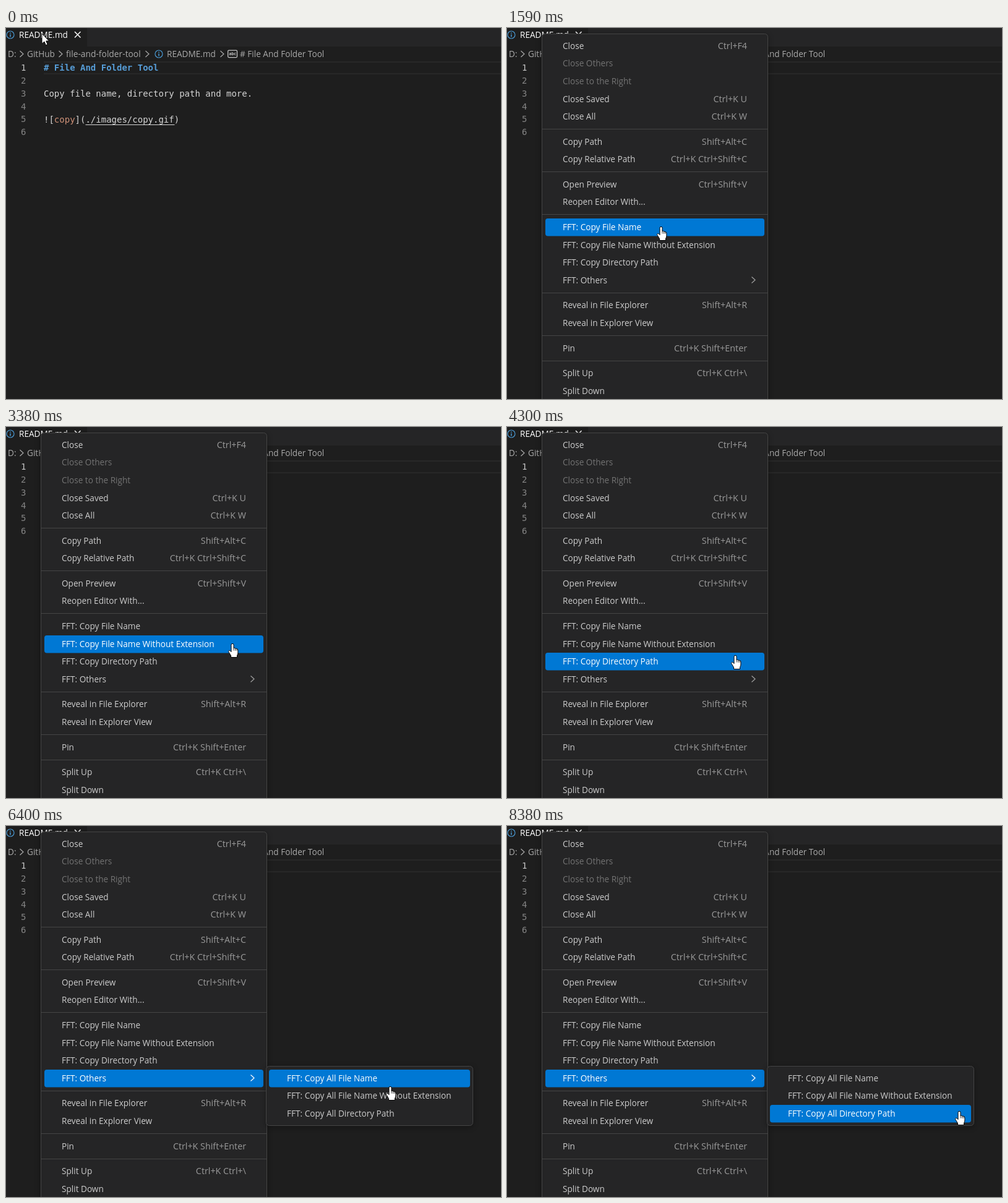
An HTML page that plays this animation: 800 px wide and 600 px high, repeating every 8690 ms.

```html
<!DOCTYPE html>
<html lang="en">
<head>
<meta charset="utf-8">
<title>Editor tab context menu</title>
<style>
  html, body { margin: 0; width: 100%; height: 100%; overflow: hidden; background: #1e1e1e; }
  svg { display: block; width: 100%; height: 100%; }
  text { font: 13.6px "Open Sans", "Noto Sans", sans-serif; white-space: pre; }
  .mono { font: 14px "DejaVu Sans Mono", monospace; }
  .bold { font-weight: bold; }
  .key { font-size: 14.3px; }
  .path { font-size: 13.8px; }
  .abc { font-size: 6.5px; font-weight: bold; }
  .panel { filter: drop-shadow(0 2px 4px rgba(0, 0, 0, .36)); }
</style>
</head>
<body>
<svg id="stage" viewBox="0 0 800 600" xmlns="http://www.w3.org/2000/svg"></svg>
<script>
const LOOP = 8690, STEP = 65;
const stage = document.getElementById('stage');

function add(parent, tag, attrs, content) {
  const el = document.createElementNS(stage.namespaceURI, tag);
  for (const k in attrs) el.setAttribute(k, attrs[k]);
  if (content) el.textContent = content;
  parent.appendChild(el);
  return el;
}
const rect = (p, x, y, width, height, fill, more) =>
  add(p, 'rect', { x, y, width, height, fill, ...more });
const text = (p, x, y, content, fill, more) =>
  add(p, 'text', { x, y, fill, ...more }, content);
const line = (p, d, stroke, width = 1.2) =>
  add(p, 'path', { d, fill: 'none', stroke, 'stroke-width': width });
const chevron = (p, x, y, stroke) => line(p, `M${x} ${y - 5}l5.5 5-5.5 5`, stroke);

function info(x, y) {
  const blue = '#4a9ad4';
  add(stage, 'circle', { cx: x, cy: y, r: 6, fill: 'none', stroke: blue, 'stroke-width': 1.2 });
  line(stage, `M${x} ${y - 3.6}v1.7M${x} ${y - .8}v4.4`, blue, 1.5);
}

// Editor: tab strip, breadcrumbs, code
rect(stage, 0, 0, 800, 600, '#1e1e1e');
rect(stage, 131, 0, 669, 30, '#252526');
info(7, 11);
text(stage, 21, 16, 'README.md', '#ffffff');
line(stage, 'M111 6l9.5 9.5M120.5 6l-9.5 9.5', '#ffffff', 1.5);

const crumb = '#a9a9a9';
text(stage, 3, 47, 'D:', crumb);
text(stage, 34, 47, 'GitHub', crumb);
text(stage, 97, 47, 'file-and-folder-tool', crumb, { class: 'path' });
text(stage, 260, 47, 'README.md', crumb);
text(stage, 378, 47, '# File And Folder Tool', crumb);
for (const x of [22.5, 85.5, 225.5, 346.5]) chevron(stage, x, 42, crumb);
info(247, 42);
rect(stage, 358.7, 36.2, 14.8, 11.4, 'none', { rx: 1.5, stroke: '#c5c5c5', 'stroke-width': 1.3 });
text(stage, 366.1, 44.2, 'abc', '#c5c5c5', { class: 'abc', 'text-anchor': 'middle' });

rect(stage, 61, 54, 739, 2, '#282828');
rect(stage, 61, 73, 739, 2, '#282828');
for (let i = 0; i < 6; i++)
  text(stage, 32.4, 69 + Math.round(i * 20.85), String(i + 1), i ? '#858585' : '#c6c6c6',
    { class: 'mono', 'text-anchor': 'end' });

const plain = '#d4d4d4';
text(stage, 61, 69, '# File And Folder Tool', '#569cd6', { class: 'mono bold' });
text(stage, 61, 111, 'Copy file name, directory path and more.', plain, { class: 'mono' });
const image = text(stage, 61, 153, '', plain, { class: 'mono' });
[['![', plain], ['copy', '#ce9178'], ['](./images/copy.gif)', plain]]
  .forEach(([part, fill]) => add(image, 'tspan', { fill }, part));
rect(stage, 128.5, 156, 144, 1, plain);

// Menus
function panel(x, y, width, height) {
  const g = add(stage, 'g', {});
  rect(g, x, y, width, height, '#252526', { rx: 5, stroke: '#454545', class: 'panel' });
  return g;
}
function row(p, x, width, top, mid, label, keys) {
  const bar = rect(p, x, top, width, 28.5, '#0078d4', { rx: 4 });
  const name = text(p, x === 62 ? 90 : 454, mid + 5, label, '#cccccc');
  if (keys) text(p, 388, mid + 5, keys, '#9a9a9a', { class: 'key', 'text-anchor': 'end' });
  return { bar, name };
}

const menu = panel(56.5, 9.5, 365, 640);
for (const y of [163, 232, 301, 428, 497, 538]) rect(menu, 57, y, 364, 1, '#454545');
const items = [
  [29, 'Close', 'Ctrl+F4'],
  [57, 'Close Others'],
  [86, 'Close to the Right'],
  [115, 'Close Saved', 'Ctrl+K U'],
  [143, 'Close All', 'Ctrl+K W'],
  [184, 'Copy Path', 'Shift+Alt+C'],
  [212, 'Copy Relative Path', 'Ctrl+K Ctrl+Shift+C'],
  [253, 'Open Preview', 'Ctrl+Shift+V'],
  [281, 'Reopen Editor With...'],
  [322, 'FFT: Copy File Name'],
  [351, 'FFT: Copy File Name Without Extension'],
  [379, 'FFT: Copy Directory Path'],
  [408, 'FFT: Others'],
  [448, 'Reveal in File Explorer', 'Shift+Alt+R'],
  [477, 'Reveal in Explorer View'],
  [518, 'Pin', 'Ctrl+K Shift+Enter'],
  [558, 'Split Up', 'Ctrl+K Ctrl+\\'],
  [587, 'Split Down']
];
const rows = items.map(([mid, label, keys]) => row(menu, 62, 354, mid - 14, mid, label, keys));
rows[1].name.setAttribute('fill', '#737373');
rows[2].name.setAttribute('fill', '#737373');
const arrowMark = chevron(menu, 395.5, 407.5, '#a0a0a0');

const sub = panel(420.5, 388.5, 334, 96);
const subRows = ['Name', 'Name Without Extension', 'Directory Path'].map((s, i) =>
  row(sub, 425, 325, 394 + i * 28.5, [408, 436, 465][i],
    'FFT: Copy All ' + (i < 2 ? 'File ' : '') + s));

// Pointers, with the hot spot at 0,0
const ink = { fill: '#ffffff', stroke: '#000000', 'stroke-width': 1, 'stroke-linejoin': 'round' };
const arrow = add(stage, 'path', { ...ink, d: 'M0 0V16.5L3.9 13 6.4 18.8 9.2 17.6 6.8 12H11.6Z' });
const hand = add(stage, 'g', {});
add(hand, 'path', { ...ink, d: 'M-2 2.4a2 2 0 0 1 4 0V7.6q1.7-.8 2.6.6 1.7-.7 2.4.7 1.9-.2 1.9 1.8V15' +
  'q0 2.4-1.4 4.4V22.5H-2.4V20Q-3.6 17.4-5.8 14.4-7.2 12-5.4 11.4-3.9 11-2 13.6Z' });
line(hand, 'M2 7.6v4M4.6 8.2v3.6M7 8.9v3', '#000000', .8);

// Pointer moves: [start, end] spans and [time, x, y] points
const spans = [[740, 1590], [1650, 2170], [2390, 2850], [3220, 3380], [3840, 4300], [4480, 4540],
  [5130, 5410], [5940, 6680], [6810, 7150], [7340, 7340], [7740, 8380]];
const points = [
  [675, 58, 9], [1260, 134, 217], [1590, 249, 321],
  [1850, 296, 317], [2170, 366, 329],
  [2325, 366, 329], [2850, 366, 351],
  [3155, 366, 351], [3285, 371, 353], [3380, 366, 350],
  [3775, 366, 350], [4300, 369, 369],
  [4415, 369, 369], [4540, 372, 367],
  [5065, 372, 367], [5390, 373, 400], [5410, 373, 402],
  [5875, 373, 402], [6460, 621, 421], [6560, 680, 441], [6680, 735, 412],
  [6745, 735, 412], [7000, 741, 438], [7150, 741, 434],
  [7275, 741, 434], [7340, 737, 434],
  [7675, 737, 434], [8380, 731, 461]
];
// Lit rows: [time, menu row, submenu row]
const lit = [[0, -1, -1], [1525, 9, -1], [2585, 10, -1], [4230, 11, -1], [5325, 12, -1],
  [6070, 12, 0], [6525, 12, 1], [6590, 12, 0], [6940, 12, 1], [8130, 12, 2]];

const latest = (list, t) => list.filter(e => e[0] <= t).pop();

function pointerAt(t) {
  const span = latest(spans, t);
  if (!span) return points[0].slice(1);
  const [start, end] = span;
  const s = t >= end ? end : Math.min(end, start + Math.floor((t - start) / STEP) * STEP + STEP);
  const i = points.findIndex(p => p[0] >= s);
  const [t0, x0, y0] = points[i - 1], [t1, x1, y1] = points[i];
  const k = (s - t0) / (t1 - t0);
  return [x0 + (x1 - x0) * k, y0 + (y1 - y0) * k].map(Math.round);
}

const show = (el, on) => el.setAttribute('visibility', on ? 'inherit' : 'hidden');
const fade = (el, t, start) => el.setAttribute('opacity', t < start ? 0 : t < start + 90 ? .6 : 1);
function light(list, active) {
  list.forEach(({ bar, name }, i) => {
    show(bar, i === active);
    if (list === subRows || i > 8 && i < 13)
      name.setAttribute('fill', i === active ? '#ffffff' : '#cccccc');
  });
}

function draw(t) {
  fade(menu, t, 60);
  fade(sub, t, 5600);
  const [, main, inner] = latest(lit, t);
  light(rows, main);
  light(subRows, inner);
  arrowMark.setAttribute('stroke', main === 12 ? '#ffffff' : '#a0a0a0');
  const [x, y] = pointerAt(t);
  show(arrow, t < 740);
  show(hand, t >= 740);
  for (const el of [arrow, hand]) el.setAttribute('transform', `translate(${x} ${y})`);
}

const begin = performance.now();
function tick() {
  draw((performance.now() - begin) % LOOP);
  requestAnimationFrame(tick);
}
tick();
</script>
</body>
</html>
```
